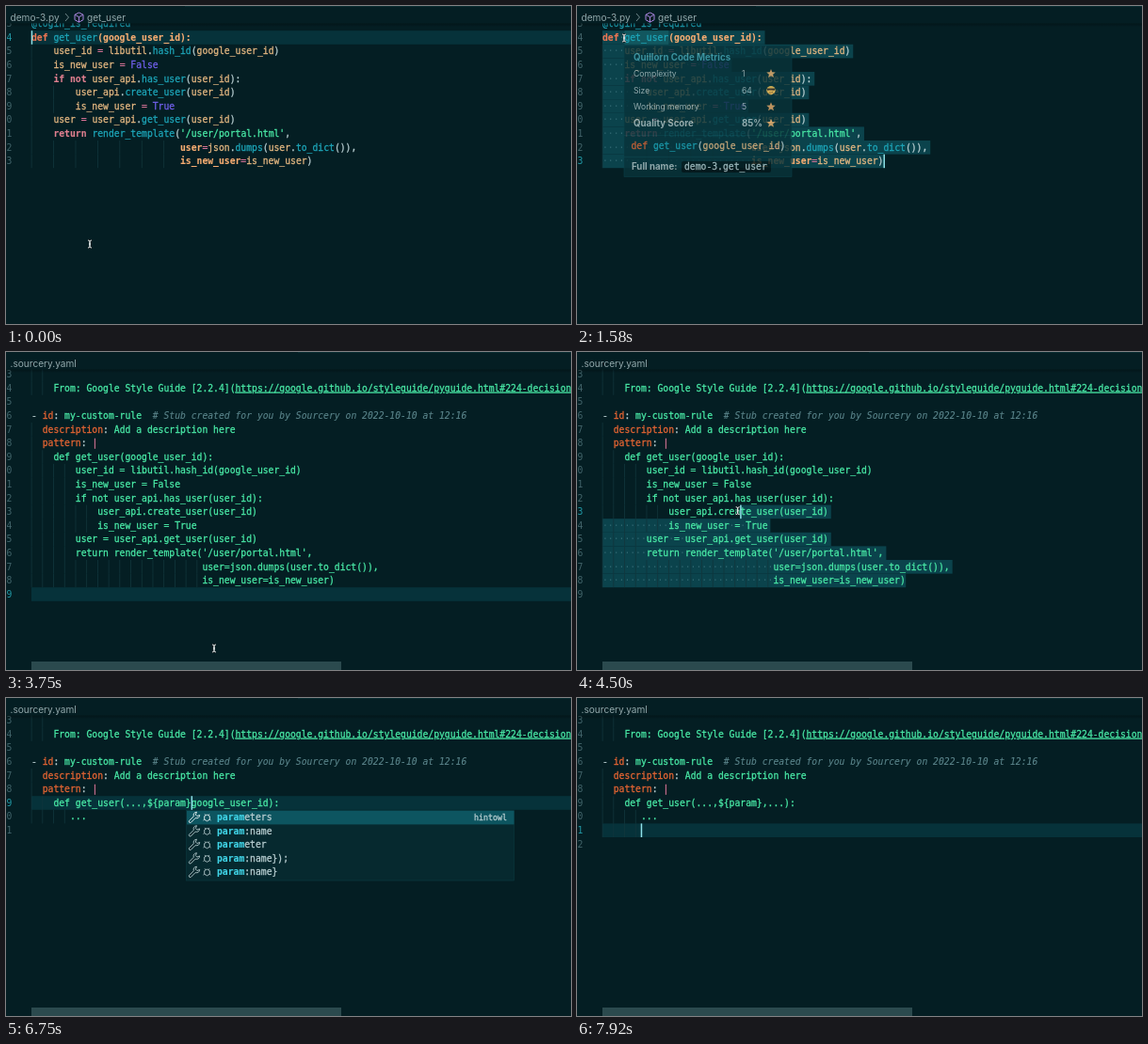
An HTML page for the animation above (8 s loop, 600x338 px).

```html
<!DOCTYPE html>
<html lang="en">
<head>
<meta charset="utf-8">
<title>Editor demo</title>
<style>
  html, body { margin: 0; width: 100%; height: 100%; overflow: hidden; background: #041e23; }
  svg { display: block; width: 600px; height: 338px; }
  text { white-space: pre; fill: currentColor; }
  .mono { font: 9.73px "DejaVu Sans Mono", monospace; color: #b9cfd2; }
  .mono, tspan { fill: currentColor; stroke: currentColor; stroke-width: .28px; }
  .ui { font: 10.1px Inter, sans-serif; color: #93a8ab; }
  .menu { font: 5.9px Inter, "DejaVu Sans", sans-serif; color: #1d2426; }
  .keys { color: #7b8486; text-anchor: end; }
  .hover { font: 8.6px Inter, sans-serif; color: #aebfc1; }
  .hover.bold { font-size: 9.7px; font-weight: 700; }
  .hover.title { color: #45a3b1; }
  .num { color: #42646a; text-anchor: end; stroke: none; }
  .on { color: #2299a6; }
  .dots { color: #2f6670; stroke: none; }
  .tag { font-size: 8.3px; }
  .d { color: #ee7653; font-weight: 700; }
  .k { color: #df7f8f; font-weight: 700; }
  .f { color: #1da5b8; }
  .b { color: #f7ad72; font-weight: 700; }
  .v { color: #e4b781; }
  .o { color: #df769b; }
  .s { color: #49e9a6; }
  .c { color: #7060eb; }
  .t { color: #e66533; }
  .u { color: #49e9a6; text-decoration: underline 1px; }
  .i { color: #5b858b; font-style: italic; }
  .m { color: #40d4e7; font-weight: 700; }
  .b, .d, .k, .m, .i { stroke-width: .1px; }
</style>
</head>
<body>
<svg id="stage" viewBox="0 0 600 338"></svg>
<script>
const LOOP = 8000, COL = 5.858, ROW = 14.6, LEFT = 27, BG = '#041e23';
const stage = document.getElementById('stage');

// "~x" switches the token class to x
const PY = [
  '~f@login_is_required',
  '~ddef ~fget_user~b(google_user_id):',
  '    ~vuser_id ~o= ~vlibutil~w.~fhash_id~w(~vgoogle_user_id~w)',
  '    ~vis_new_user ~o= ~cFalse',
  '    ~kif not ~vuser_api~w.~fhas_user~w(~vuser_id~w):',
  '        ~vuser_api~w.~fcreate_user~w(~vuser_id~w)',
  '        ~vis_new_user ~o= ~cTrue',
  '    ~vuser ~o= ~vuser_api~w.~fget_user~w(~vuser_id~w)',
  "    ~kreturn ~frender_template~w(~s'/user/portal.html'~w,",
  ' '.repeat(27) + '~buser~o=~vjson~w.~fdumps~w(~vuser~w.~fto_dict~w()),',
  ' '.repeat(27) + '~bis_new_user~o=~vis_new_user~w)'
];
const YAML_HEAD = [
  '    ',
  '    ~sFrom: Google Style Guide [2.2.4](~uhttps://google.github.io/styleguide/pyguide.html#224-decisions',
  '',
  '~w- ~tid~w: ~smy-custom-rule  ~i# Stub created for you by Sourcery on 2022-10-10 at 12:16',
  '  ~tdescription~w: ~sAdd a description here',
  '  ~tpattern~w: ~o|'
];
const plain = line => line.replace(/~./g, '');
const YAML_BODY = PY.slice(1).map(line => ('    ' + plain(line)).replace(/^ */, '$&~s'));

const rect = (x, y, w, h, fill, extra = '') =>
  `<rect x="${x}" y="${y}" width="${w}" height="${h}" fill="${fill}" ${extra}/>`;
const text = (x, y, cls, body) => `<text x="${x}" y="${y}" class="${cls}">${body}</text>`;
const path = (d, stroke, width = 1, fill = 'none') =>
  `<path d="${d}" fill="${fill}" stroke="${stroke}" stroke-width="${width}" stroke-linejoin="round"/>`;
const clamp = (v, a, b) => Math.max(a, Math.min(b, v));
const typed = (s, t, start, end) => s.slice(0, clamp(Math.ceil((t - start) / (end - start) * s.length), 0, s.length));

function tokens(line) {
  const [lead, ...rest] = line.split('~');
  return lead + rest.map(p => `<tspan class="${p[0]}">${p.slice(1)}</tspan>`).join('');
}

// caret: [row, col]; sel: [row, col, row, col]; word: [row, col, length, colour]
function editor(lines, { mid, first, tab, caret, blink = true, sel, word }) {
  const y = r => mid + r * ROW;
  const x = c => LEFT + c * COL;
  let out = sel ? '' : rect(LEFT, y(caret[0]) - 7.3, 600, ROW, '#06323a');
  let overlay = '';
  lines.forEach((line, r) => {
    const raw = plain(line), indent = raw.search(/\S|$/);
    if (sel && r >= sel[0] && r <= sel[2]) {
      const a = r === sel[0] ? sel[1] : 0;
      const b = r === sel[2] ? sel[3] : raw.length;
      const tail = r === sel[2] ? 0 : 0.45;
      if (b + tail > a) out += rect(x(a), y(r) - 7.3, (b - a + tail) * COL, ROW, '#0b434c');
      const dots = raw.slice(a, b).replace(/./g, c => c === ' ' ? '·' : ' ');
      overlay += text(x(a), y(r) + 3.2, 'mono dots', dots);
    }
    for (let c = 0; c < indent; c += tab) out += rect(x(c) - 0.3, y(r) - 7.3, 0.8, ROW, '#12363c');
    overlay += text(6.3, y(r) + 3.2, 'mono num' + (r === caret[0] ? ' on' : ''), first + r);
    overlay += text(LEFT, y(r) + 3.2, 'mono', tokens(line));
  });
  if (word) out += rect(x(word[1]), y(word[0]) - 7.3, word[2] * COL, ROW, word[3]);
  if (blink) overlay += rect(x(caret[1]) - 0.3, y(caret[0]) - 7.3, 1.5, ROW, '#8fe3ea');
  return out + overlay;
}

function header(file, symbol) {
  let out = rect(0, 0, 600, 18.5, BG) + rect(0, 18.5, 600, 4, 'url(#shade)')
    + rect(symbol ? 190 : 310, 0, 410, 1, '#082c31') + text(4.5, 16, 'ui', file);
  if (symbol) {
    out += path('M63 8l3.5 4-3.5 4', '#71898c')
      + path('M77.5 7l4.5 2.3v5.4l-4.5 2.5-4.5-2.5V9.3zM73 9.3l4.5 2.4 4.5-2.4M77.5 11.7v5.5', '#a983dc')
      + text(86, 16, 'ui', symbol);
  }
  return out;
}

function star(x, y) {
  const pts = Array.from({ length: 10 }, (_, i) => {
    const a = i * Math.PI / 5, r = i % 2 ? 2.2 : 5;
    return `${x + r * Math.sin(a)},${y - r * Math.cos(a)}`;
  });
  return `<polygon points="${pts.join(' ')}" fill="#e5ad6c"/>`;
}

function hoverCard(opacity) {
  let out = rect(50, 42, 178, 139.5, '#08333a', 'stroke="#0d454d" stroke-width=".6"')
    + text(60, 57.7, 'hover bold title', 'Quillorn Code Metrics');
  [['Complexity', '1'], ['Size', '64'], ['Working memory', '5'], ['Quality Score', '85%']].forEach(([label, value], i) => {
    const y = 72 + i * 17.6, cls = i === 3 ? 'hover bold' : 'hover';
    out += text(60, y + 3.2, cls, label) + text(175, y + 3.2, cls, value);
    out += i === 1
      ? `<circle cx="206" cy="${y}" r="4.6" fill="#eebd55"/>` + path(`M202 ${y - 1}h8`, '#3a3028', 2) + path(`M204 ${y + 2}q2 1.5 4 0`, '#6b4a20', 0.7)
      : star(206, y);
  });
  return `<g opacity="${opacity}">${out}`
    + rect(50, 137, 178, 0.6, '#0f4a52') + rect(50, 160, 178, 0.6, '#0f4a52')
    + text(57.5, 152, 'mono', tokens('~tdef ~fget_user~w(~vgoogle_user_id~w)'))
    + text(58, 174.4, 'hover bold', 'Full name:') + rect(111, 165, 95, 12, '#04191c', 'rx="2"')
    + text(114, 174, 'mono', 'demo-3.get_user') + '</g>';
}

const MENU = [
  ['Go to Definition|F12', 'Go to References|⇧F12', 'Peek|>'],
  ['Find All References|⌥⇧F12'],
  ['Rename Symbol|F2', 'Change All Occurrences|⌘F2', 'Format Document|⌥⇧ F', 'Format Document With...',
    'Format Selection [⌘K ⌘F]', 'Refactor...|⌃⇧ R', 'Source Action...'],
  ['Commit Changes|>'],
  ['Cut|⌘ X', 'Copy|⌘ C', 'Paste|⌘ V'],
  ['Run Current File in Interactive Window', 'Run From Line in Interactive Window',
    'Run Selection/Line in Interactive Window|⇧⏎', 'Run To Line in Interactive Window'],
  ['Run Python File in Terminal', 'Run Selection/Line in Python Terminal|⇧⏎'],
  ['Sort Imports'],
  ['Command Palette...|⇧⌘ P', 'Quillorn|>']
];

function contextMenu(mouse) {
  let out = rect(49.5, 30, 161, 295, '#01090b', 'rx="5" opacity=".5"')
    + rect(50, 29.5, 159.5, 294.5, '#b2b9ba', 'rx="4.5"');
  let y = 38;
  MENU.forEach((group, g) => {
    if (g) {
      out += rect(57, y - 2.7, 145, 0.6, '#969fa1');
      y += 5.15;
    }
    group.forEach(item => {
      const [label, key] = item.split('|');
      const hot = label === 'Quillorn' && Math.abs(mouse.y - y) < 5;
      if (hot) out += rect(53, y - 5.2, 153.5, 10.4, '#3f83c4', 'rx="2"');
      out += text(56.5, y + 2.1, 'menu', label);
      if (key === '>') out += path(`M198 ${y - 2}l2.4 2-2.4 2`, '#2a3133', 0.9);
      else if (key) out += text(202, y + 2.1, 'menu keys', key);
      y += 10.33;
    });
  });
  return out;
}

function suggestions() {
  let out = rect(191.5, 119.5, 348, 74.5, '#06292f', 'stroke="#0a3a40" stroke-width=".6"')
    + rect(192, 119.8, 347.5, 14.6, '#0d5560');
  ['eters', ':name', 'eter', ':name});', ':name}'].forEach((tail, i) => {
    const y = 127 + i * 14.5, ink = i ? '#a3b9bc' : '#d5e4e6';
    out += path(`M194.3 ${y + 3.8}l5-5q-1-4 3.2-4.6l-1.2 2.8 1.6 1.6 2.8-1.2q-.6 4.2-4.6 3.2l-5 5q-2.2 0-1.8-1.8z`, ink)
      + path(`M213.5 ${y - 3}l2.8 1.6v3.6l-2.8 1.6-2.8-1.6v-3.6zM211.2 ${y - 3.6}l1 1.4M215.8 ${y - 3.6}l-1 1.4M210.7 ${y + 2.2}l-1.2 .8M216.3 ${y + 2.2}l1.2 .8`, ink)
      + text(224, y + 3.4, 'mono', tokens('~mparam~w' + tail));
  });
  return out + text(497, 130, 'mono tag', 'hintowl');
}

const MOUSE = [
  [0, 89, 253], [250, 89, 253], [800, 54, 42], [1000, 50, 34], [1980, 50, 34], [2400, 140.5, 293],
  [2520, 140.5, 293], [2750, 120, 316], [3000, 120, 316], [3300, 196, 317], [3500, 221, 315],
  [3800, 221, 315], [4150, 346, 243], [4300, 346, 243], [4640, 70, 126], [4980, 70, 126], [5300, 127, 111]
];

function mouseAt(t) {
  const i = MOUSE.findIndex(k => k[0] > t);
  if (i < 0) return { x: 127, y: 111 };
  const [t0, x0, y0] = MOUSE[i - 1], [t1, x1, y1] = MOUSE[i];
  const u = (t - t0) / (t1 - t0), e = u * u * (3 - 2 * u);
  return { x: x0 + (x1 - x0) * e, y: y0 + (y1 - y0) * e };
}

function pointer({ x, y }, arrow) {
  if (arrow) return path(`M${x} ${y - 1}v6l1.5-1.3 1 2.2 1-.5-1-2h2z`, '#fff', 0.5, '#000');
  const d = `M${x - 2} ${y - 4}q2 0 2 1.5v5q0 1.5-2 1.5M${x + 2} ${y - 4}q-2 0-2 1.5v5q0 1.5 2 1.5M${x - 1} ${y}h2`;
  return path(d, '#0a1214', 2) + path(d, '#e6eeee', 1);
}

function pyScene(t, mouse) {
  const steps = clamp(Math.floor((t - 250) / 85), 0, 9);
  const caret = t > 1120 ? [10, 51] : [1 + steps, 0];
  const menu = t >= 1920 && t < 3420;
  let out = editor(PY, {
    mid: 18.9, first: 3, tab: 4, caret, blink: t < 1920,
    sel: steps ? [1, 0, ...caret] : null,
    word: t > 1250 && t < 1920 ? [1, 4, 8, '#12575f'] : null
  }) + header('demo-3.py', 'get_user');
  if (t > 1400 && t < 1830) out += hoverCard(clamp((t - 1400) / 220, 0, 1));
  if (menu) out += contextMenu(mouse);
  return out + pointer(mouse, menu);
}

function yamlScene(t, mouse) {
  const view = { mid: 23.9, first: 3, tab: 2 };
  let body;
  if (t < 4720) {
    body = [...YAML_BODY, ''];
    view.caret = [16, 0];
    view.blink = t % 1000 < 500;
    if (t >= 4300) {
      const row = clamp(Math.round((mouse.y - view.mid) / ROW), 7, 15);
      const col = clamp(Math.round((mouse.x - LEFT) / COL), 7, 55);
      view.caret = [row, col];
      view.sel = [row, col, 15, 55];
      view.blink = true;
    }
  } else {
    const dots = typed('...', t, 4760, 4960);
    const before = typed('...,', t, 5560, 5820) + typed('${param}', t, 5920, 6300);
    const after = typed(',...', t, 7150, 7450);
    const name = t < 7100 ? 'google_user_id' : '';
    body = ['    ~sdef get_user(' + before + after + name + '):', '       ~s' + dots, ''];
    const col = 17 + before.length + after.length;
    view.caret = [6, col];
    if (t < 5320) view.caret = [7, 7 + dots.length];
    else if (t < 5560) view.word = [6, 17, 14, '#17474e'];
    else if (t >= 6980 && t < 7100) {
      view.caret = [6, col + 14];
      view.sel = [6, col, 6, col + 14];
    } else if (t >= 7620) {
      view.caret = [7, 10];
      if (t >= 7780) {
        body.splice(2, 0, '       ');
        view.caret = [8, 7];
      }
    }
  }
  let out = editor([...YAML_HEAD, ...body], view) + header('.sourcery.yaml')
    + rect(27, 329, 329, 9, '#2b4a4e');
  if (t >= 6260 && t < 6860) out += suggestions();
  return t < 5580 ? out + pointer(mouse, false) : out;
}

const DEFS = '<defs><linearGradient id="shade" x2="0" y2="1"><stop stop-color="#01090b" stop-opacity=".4"/>'
  + '<stop offset="1" stop-color="#01090b" stop-opacity="0"/></linearGradient></defs>';
let last = '';

function draw(now) {
  const t = now % LOOP, mouse = mouseAt(t);
  const picture = DEFS + rect(0, 0, 600, 338, BG) + (t < 3500 ? pyScene(t, mouse) : yamlScene(t, mouse));
  if (picture !== last) stage.innerHTML = last = picture;
  requestAnimationFrame(() => draw(performance.now()));
}
draw(performance.now());
</script>
</body>
</html>
```
